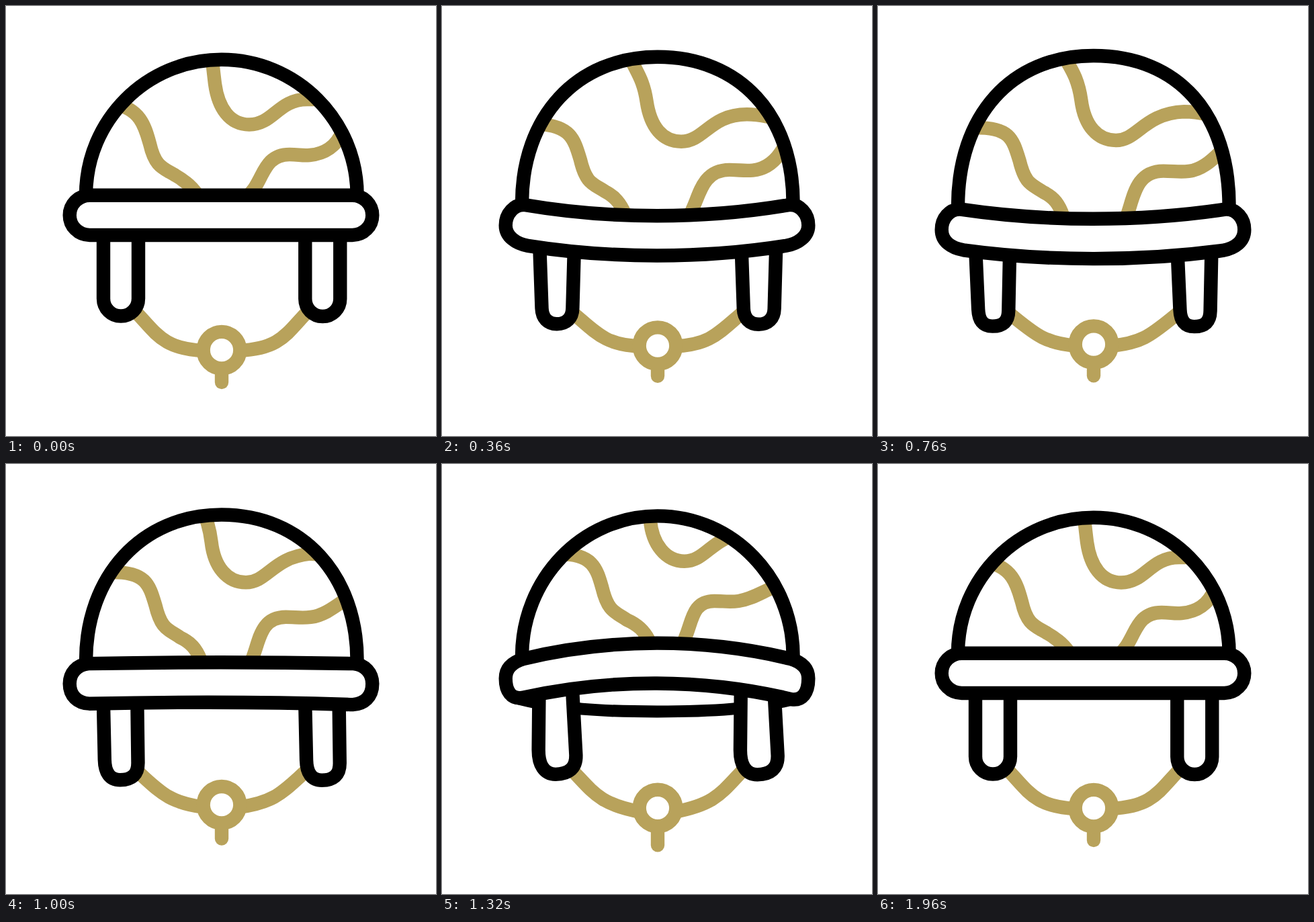
These frames come from a looping animation (640x640 px, 2000 ms). An HTML page:

```html
<!DOCTYPE html>
<html lang="en">
<head>
<meta charset="utf-8">
<title>Helmet</title>
<style>
  html, body { margin: 0; width: 100%; height: 100%; overflow: hidden; background: #fff; }
  svg { display: block; width: 100vw; height: 100vh; }
  path, circle { stroke-width: 20.4; fill: none; stroke: #000; }
  .thin { stroke-width: 18; }
  .gold { stroke: #b8a25b; stroke-linecap: round; }
  .solid { fill: #fff; }
</style>
</head>
<body>
<svg viewBox="0 0 640 640">
  <defs>
    <clipPath id="shell"><path data-part="dome" data-tail="V400H119Z"/></clipPath>
  </defs>
  <path class="thin" data-part="rim"/>
  <g clip-path="url(#shell)">
    <path class="gold" data-part="camoTop"/>
    <path class="gold" data-part="camoLeft"/>
    <path class="gold" data-part="camoRight"/>
  </g>
  <path data-part="dome"/>
  <path class="gold" data-part="chin"/>
  <path class="gold" data-part="chin" transform="translate(641.6) scale(-1 1)"/>
  <path class="gold" data-part="tag"/>
  <circle id="ring" class="gold solid" cx="321" r="27.3"/>
  <path class="solid" data-part="ear"/>
  <path class="solid" data-part="ear" transform="translate(300.3 .5)"/>
  <path class="solid" data-part="brim"/>
</svg>
<script>
// Each part: level, tipped down, tipped up
const parts = {
  rim: [
    'M105 329 C170 332 245 329 320 329 C395 329 470 332 535 329',
    'M105 333 C170 335 245 335 320 335 C395 335 470 335 535 333',
    'M105 347 C170 366 245 369 320 369 C395 369 470 366 535 347'
  ],
  dome: [
    'M119 281.6 C119 170.2 209.4 79.8 320.8 79.8 C432.2 79.8 522.6 170.2 522.6 281.6',
    'M119 302 C119 161 194 73 320.8 73 C452 73 522.6 158 522.6 302',
    'M119 286 C119 172 208 77.5 320.8 77.5 C433.6 77.5 522.6 172 522.6 286'
  ],
  camoTop: [
    'M306 72 C308 90 309 100 311 116 C316 152 333 176.5 362 176.5 C398 176.5 405 139 448 139 C452 139 456 139 460 139',
    'M262 80 C275 103 293 114 300 160 C306 200 325 219.5 352 219.5 C385 219.5 395 177 458 177 C475 177 490 180 502 183',
    'M306 30 C308 50 309 65 310 82 C313 118 333 143.5 361 143.5 C392 143.5 400 110 448 101 C450 101 452 100 454 100'
  ],
  camoLeft: [
    'M160 146 C200 152 207 180 214 205 C222 240 234 241 252 252 C266 260 276 268 284 280',
    'M135 197 C185 198 189 210 200 245 C209 283 219 281 236 293 C252 301 258 312 264 330',
    'M175 133 C225 132 231 155 239 183 C248 220 259 219 276 231 C292 238 302 247 309 262'
  ],
  camoRight: [
    'M358 284 C384 264 380 221 422 221 C436 221 440 223 452 222 C475 220 492 208 500 188',
    'M370 340 C383 312 383 260 432 260 C448 260 456 262 470 260.5 C486 259 500 248 514 228',
    'M354 272 C374 244 366 203 405 203 C418 203 428 205 441 203 C462 200 478 188 500 180'
  ],
  chin: [
    'M190 452 C225 488 232 510 295 513',
    'M195 457.5 C233 485 250 501 295 501.5',
    'M190 452 C225 488 232 506 295 518'
  ],
  tag: ['M321 546 L321 560', 'M321 540 L321 544.3', 'M321 546 L321 567.6'],
  ear: [
    'M145 335 L145 435.5 C145 450 156.6 461.5 171 461.5 C185.4 461.5 197 450 197 435.5 L197 335',
    'M145 360 L151 460 C152 475 158 481.5 171 481.5 C185 481.5 192 475 192.5 460 L197 370',
    'M144.5 335 L143.5 425 C143.5 447 152 461.5 169 461.5 C189 461 200 452 199.5 433 L194 335'
  ],
  brim: [
    'M124.5 281.7 C250 281.7 390 281.7 515.5 281.7 C532 281.7 545.3 295 545.3 311.4 C545.3 327.8 532 341 515.5 341 C390 341 250 341 124.5 341 C108 341 94.7 327.8 94.7 311.4 C94.7 295 108 281.7 124.5 281.7Z',
    'M124 306.5 C250 343 390 343 516 306.5 C533 303 545.3 320 545.3 337 C545.3 354 528 363 510 368 C390 401.3 250 401.3 130 368 C112 363 94.7 354 94.7 337 C94.7 320 107 303 124 306.5Z',
    'M122 289.5 C250 257.5 390 257.5 518 289.5 C536 295 545.3 304 545.3 319 C545.3 341 536 352 521 350 C390 317.5 250 317.5 119 347.5 C103 350 94.7 338 94.7 319 C94.7 304 104 295 122 289.5Z'
  ]
};

const LOOP = 2000, STEP = 40;
const START = 133, LOW = 540, HIGH = 1333, END = 1960;
const DIP = 1.05;
const NUMBER = /[\d.]+/g;

const ramp = (t, a, b) => Math.min(1, Math.max(0, (t - a) / (b - a)));
const blend = (v, down, up) => v[0] + down * (v[1] - v[0]) + up * (v[2] - v[0]);

function morph([rest, low, high], down, up) {
  const a = low.match(NUMBER), b = high.match(NUMBER);
  let i = 0;
  return rest.replace(NUMBER, n => {
    const v = blend([+n, +a[i], +b[i]], down, up);
    i++;
    return v.toFixed(2);
  });
}

const nodes = document.querySelectorAll('[data-part]');
const ring = document.getElementById('ring');

function draw(now) {
  const t = Math.floor(now % LOOP / STEP) * STEP;
  const rise = ramp(t, LOW, HIGH);
  const down = DIP * (t < LOW ? ramp(t, START, LOW) : 1 - rise);
  const up = t < HIGH ? rise : 1 - ramp(t, HIGH, END);
  for (const node of nodes) {
    const { part, tail = '' } = node.dataset;
    node.setAttribute('d', morph(parts[part], down, up) + tail);
  }
  ring.setAttribute('cy', blend([512.2, 501, 512.2], down, up));
}

const begin = performance.now();
function tick() {
  draw(performance.now() - begin);
  requestAnimationFrame(tick);
}
tick();
</script>
</body>
</html>
```
